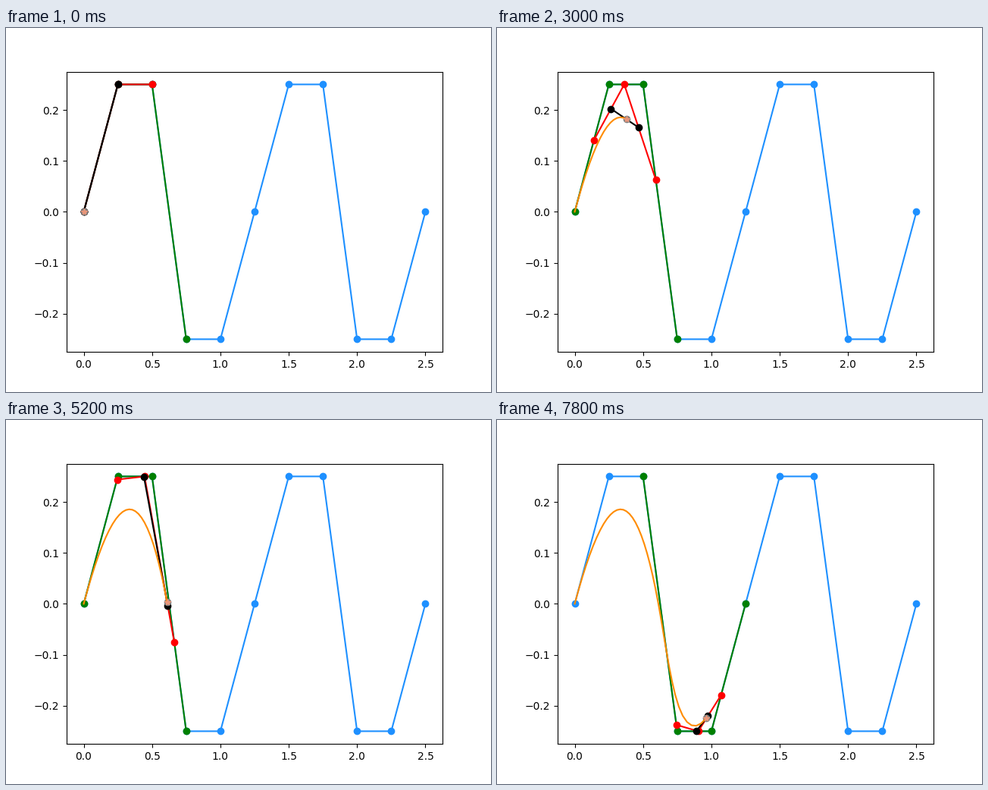
A matplotlib script for the animation above (8000 ms loop, 640x480 px).

```python
import numpy as np
import matplotlib.pyplot as plt
from matplotlib.animation import FuncAnimation

DEGREE = 3
FRAMES = 40
INTERVAL = 200
STEP = 0.15  # knot parameter advance per frame

heights = [0, .25, .25, -.25, -.25, 0, .25, .25, -.25, -.25, 0]
ctrl = np.column_stack([np.arange(len(heights)) * 0.25, heights])

# Integer knots, clamped at both ends
knots = np.arange(len(ctrl) + DEGREE + 1, dtype=float)
knots[:DEGREE + 1] = 0
knots[-DEGREE - 1:] = knots[-1]


def de_boor(t):
    """Return the control points of every de Boor level at parameter t."""
    k = np.searchsorted(knots, t, side="right") - 1
    k = min(max(k, DEGREE), len(ctrl) - 1)
    levels = [ctrl[k - DEGREE:k + 1]]
    for r in range(1, DEGREE + 1):
        i = np.arange(k - DEGREE + r, k + 1)
        a = (t - knots[i]) / (knots[i + DEGREE + 1 - r] - knots[i])
        a = a[:, None]
        prev = levels[-1]
        levels.append((1 - a) * prev[:-1] + a * prev[1:])
    return levels


steps = [de_boor(n * STEP) for n in range(FRAMES)]
path = np.array([s[-1][0] for s in steps])

fig, ax = plt.subplots(figsize=(6.4, 4.8), dpi=100)
ax.plot(*ctrl.T, "o-", color="dodgerblue")
level_lines = [ax.plot([], [], "o-", color=c)[0]
               for c in ("green", "red", "black", "gray")]
curve, = ax.plot([], [], color="darkorange")
tip, = ax.plot([], [], "*", color="darksalmon")
ax.set_xlim(-0.125, 2.625)
ax.set_ylim(-0.275, 0.275)


def update(n):
    for line, pts in zip(level_lines, steps[n]):
        line.set_data(*pts.T)
    curve.set_data(*path[:n + 1].T)
    tip.set_data(*path[n:n + 1].T)
    return [*level_lines, curve, tip]


anim = FuncAnimation(fig, update, frames=FRAMES, interval=INTERVAL,
                     init_func=lambda: update(0), repeat=True, repeat_delay=0)
plt.show()
```
